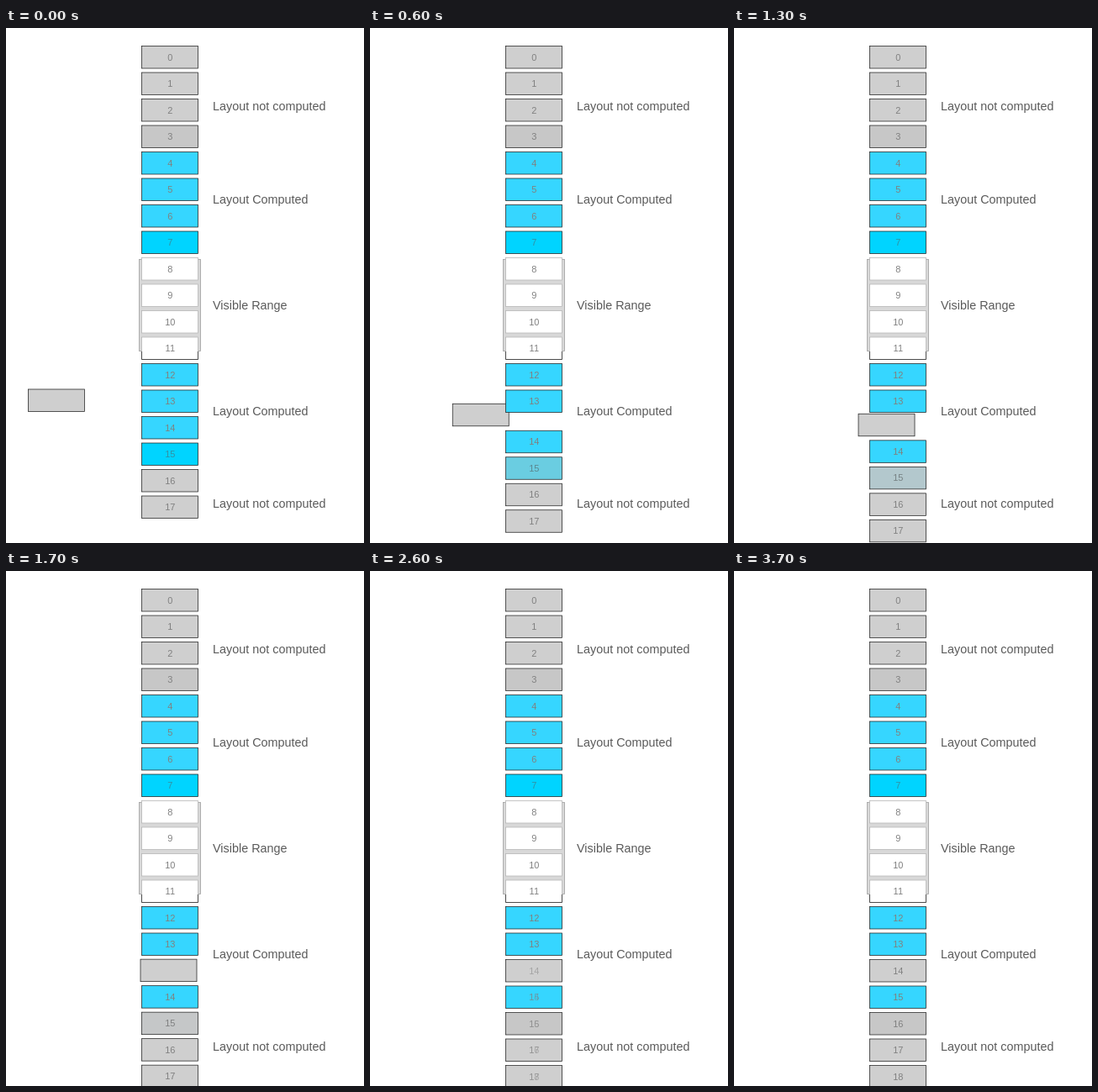
Recreate the animation shown at these times as an HTML page. Size 426 px wide and 613 px high, loop 4100 ms.

```html
<!DOCTYPE html>
<html lang="en">
<head>
<meta charset="utf-8">
<title>Inserting a row</title>
<style>
html, body { margin: 0; width: 100%; height: 100%; overflow: hidden; background: #fff; }
svg { display: block; font-family: "Liberation Sans", Arial, sans-serif; }
.box { stroke: #222; stroke-width: .75; }
.num { font-size: 11px; fill: #808080; text-anchor: middle; }
.cap { font-size: 14.4px; fill: #5a5a5a; }
</style>
</head>
<body>
<svg id="stage" width="426" height="613" viewBox="0 0 426 613"></svg>
<script>
const LOOP = 4100, TICK = 100, LENGTH = 1900, FADE_START = 2000;
const LEFT = 161.5, TOP = 21.5, STEP = 31.5, W = 67, H = 26.5;
const INSERT = 14, START = { x: 26.4, y: 430 };
const GREY = '#cfcfcf', DARK = '#c7c7c7', CYAN = '#36d6ff', BRIGHT = '#00d4ff';
const BRIGHT_TEXT = [50, 145, 165];
const stage = document.getElementById('stage');
const rowY = i => TOP + STEP * i;

function rowFill(i) {
  if (i === 3) return DARK;
  if (i === 7 || i === 15) return BRIGHT;
  if (i < 4 || i > 15) return GREY;
  return i > 7 && i < 12 ? '#fff' : CYAN;
}

const box = (fill, stroke = '#222') =>
  `<rect class="box" width="${W}" height="${H}" style="fill:${fill};stroke:${stroke}"/>`;
const num = (n, cls = '') => `<text class="num ${cls}" x="33.8" y="17">${n}</text>`;
const group = (id, x, y, body) => `<g id="${id}" transform="translate(${x} ${y})">${body}</g>`;

function row(i) {
  const visible = i > 7 && i < 12;
  const labels = i < INSERT ? num(i) : num(i, 'old') + num(i + 1, 'new');
  return group('row' + i, LEFT, rowY(i), box(rowFill(i), visible ? '#b4b4b4' : '#222') + labels);
}

const captions = [
  ['Layout not computed', 98], ['Layout Computed', 209], ['Visible Range', 335],
  ['Layout Computed', 461], ['Layout not computed', 571]
];

stage.innerHTML =
  '<rect x="158.5" y="275.5" width="73" height="109" fill="#d8d8d8" stroke="#a0a0a0" stroke-width=".8"/>' +
  group('insert', START.x, START.y, box(GREY) + num(INSERT, 'new')) +
  Array.from({ length: 18 }, (_, i) => row(i)).join('') +
  '<path class="box" fill="none" d="M161.5 385V394.5H228.5V385"/>' +
  captions.map(([text, y]) => `<text class="cap" x="246" y="${y}">${text}</text>`).join('');

const find = id => document.getElementById(id);
const oldNums = stage.querySelectorAll('.old');
const newNums = stage.querySelectorAll('.new');
const edgeBox = find('row15').querySelector('rect');
const edgeNum = find('row15').querySelector('.old');
find('row7').querySelector('text').style.fill = `rgb(${BRIGHT_TEXT})`;

const mix = (a, b, k) => a + (b - a) * k;
const mixColor = (a, b, k) => `rgb(${a.map((v, i) => Math.round(mix(v, b[i], k)))})`;
const place = (el, x, y) => el.setAttribute('transform', `translate(${x} ${y})`);

function easeOut(time) {
  const k = Math.min(1, Math.max(0, time / LENGTH));
  return 1 - (1 - k) ** 2;
}

function draw(now) {
  const time = Math.floor((now % LOOP) / TICK) * TICK;
  const move = easeOut(time), fade = easeOut(time - FADE_START);

  place(find('insert'), mix(START.x, LEFT, move), mix(START.y, rowY(INSERT), move));
  for (let i = INSERT; i < 18; i++) place(find('row' + i), LEFT, rowY(i + move));
  edgeBox.style.fill = mixColor([0, 212, 255], [199, 199, 199], move);
  edgeNum.style.fill = mixColor(BRIGHT_TEXT, [128, 128, 128], move);
  oldNums.forEach(el => el.style.opacity = 1 - fade);
  newNums.forEach(el => el.style.opacity = fade);
}

function frame() {
  draw(performance.now());
  requestAnimationFrame(frame);
}
frame();
</script>
</body>
</html>
```
